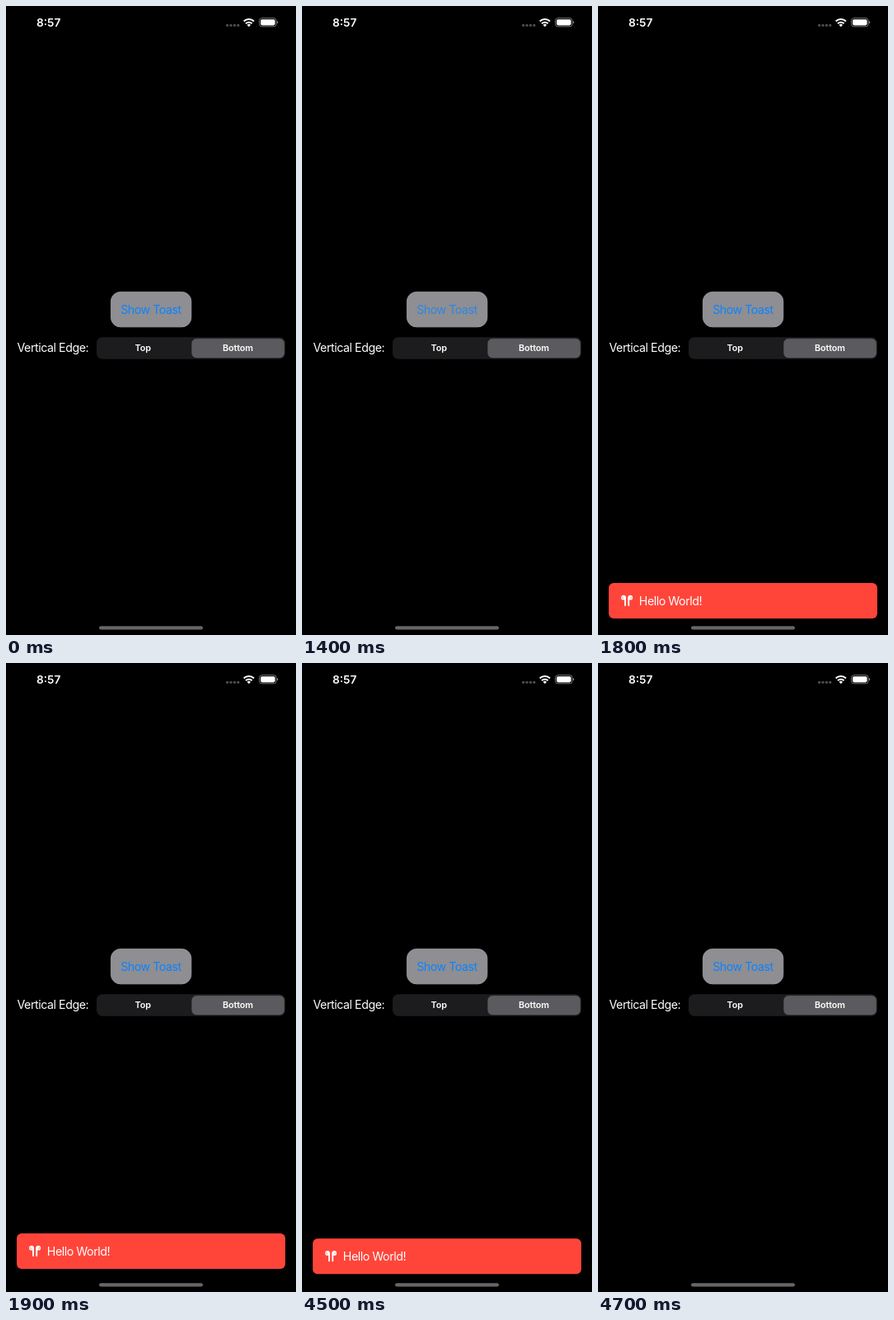
Recreate the animation shown at these times as an HTML page. Size 352 px wide and 762 px high, loop 4.9 s.

```html
<!DOCTYPE html>
<html lang="en">
<head>
<meta charset="utf-8">
<title>Toast demo</title>
<style>
  html, body { margin: 0; width: 100%; height: 100%; overflow: hidden; background: #000; }
  svg { display: block; width: 352px; height: 762px; }
  text { font: 14.2px Inter, Roboto, sans-serif; letter-spacing: -.45px; fill: #fff; text-anchor: middle; }
  .time { font-size: 13.7px; font-weight: 600; letter-spacing: 0; }
  .segment { font-size: 10.8px; font-weight: 600; letter-spacing: -.1px; }
  #label { fill: #0a84ff; }
</style>
</head>
<body>
<svg viewBox="0 0 352 762">
  <!-- status bar -->
  <text class="time" x="51.7" y="25">8:57</text>
  <g fill="#4b4b4d">
    <circle cx="268.6" cy="23.4" r="1.7"/>
    <circle cx="273" cy="23.4" r="1.7"/>
    <circle cx="277.4" cy="23.4" r="1.7"/>
    <circle cx="281.8" cy="23.4" r="1.7"/>
  </g>
  <g fill="none" stroke="#fff" stroke-width="2">
    <path d="M288.6 18.5a8.8 8.8 0 0 1 12.4 0"/>
    <path d="M291 21.2a5.4 5.4 0 0 1 7.6 0"/>
  </g>
  <path d="M292.6 22.9a3.2 3.2 0 0 1 4.4 0l-2.2 2.3z" fill="#fff"/>
  <rect x="307.5" y="14.7" width="20.6" height="10.2" rx="3.1" fill="none" stroke="#777"/>
  <rect x="309" y="16.2" width="17.6" height="7.2" rx="1.8" fill="#fff"/>
  <path d="M329.1 18v3.6q1.3-.5 1.3-1.8t-1.3-1.8" fill="#888"/>

  <!-- controls -->
  <rect x="127.4" y="346.4" width="97.4" height="42.4" rx="11.5" fill="#8e8e93" stroke="#9c9ca0" stroke-width=".9"/>
  <text id="label" x="176" y="372.6">Show Toast</text>
  <text x="56.8" y="419.2">Vertical Edge:</text>
  <rect x="110" y="401.3" width="229" height="26.4" rx="7" fill="#1c1c1e"/>
  <rect x="225.7" y="403.2" width="111.9" height="22.8" rx="5.5" fill="#5b5b5f" stroke="#69696c" stroke-width=".5"/>
  <text class="segment" x="166.2" y="418.4">Top</text>
  <text class="segment" x="281.5" y="418.4">Bottom</text>

  <g id="toast">
    <rect x="13" width="326" height="43" rx="6" fill="#ff453a"/>
    <g fill="#fff" stroke="#fff" stroke-linecap="round">
      <circle cx="31" cy="17.7" r="2.9" stroke="none"/>
      <circle cx="39.2" cy="17.7" r="2.9" stroke="none"/>
      <path d="M33 17.8v9.2M37.2 17.8v9.2" fill="none" stroke-width="1.9"/>
    </g>
    <path d="M29.4 17.2l1.2 1.4M40.8 17.2l-1.2 1.4" stroke="#ff453a" stroke-width=".9"/>
    <text x="88" y="26.6">Hello World!</text>
  </g>
  <rect x="113" y="751.2" width="126" height="4.2" rx="2.1" fill="#666668"/>
</svg>
<script>
  const LOOP = 4900, STEP = 100, REST = 691, HIDDEN = 800;
  const label = document.getElementById('label');
  const toast = document.getElementById('toast');
  const clamp = x => Math.min(1, Math.max(0, x));
  const smooth = x => x * x * (3 - 2 * x);

  // Quick dim on press, slower recovery on release.
  function labelOpacity(t) {
    if (t < 1100 || t >= 1500) return 1;
    return t < 1200 ? .55 : .25 + .75 * (t - 1200) / 300;
  }

  function toastY(t) {
    if (t < 1700 || t >= 4700) return HIDDEN;
    if (t < 1900) return REST + 69 * Math.exp((1700 - t) / 46.4);
    return REST + 74 * smooth(clamp((t - 4450) / 280));
  }

  function draw(now) {
    const t = Math.floor(now % LOOP / STEP) * STEP;
    label.setAttribute('opacity', labelOpacity(t));
    toast.setAttribute('transform', `translate(0 ${toastY(t)})`);
    requestAnimationFrame(draw);
  }
  draw(performance.now());
</script>
</body>
</html>
```
